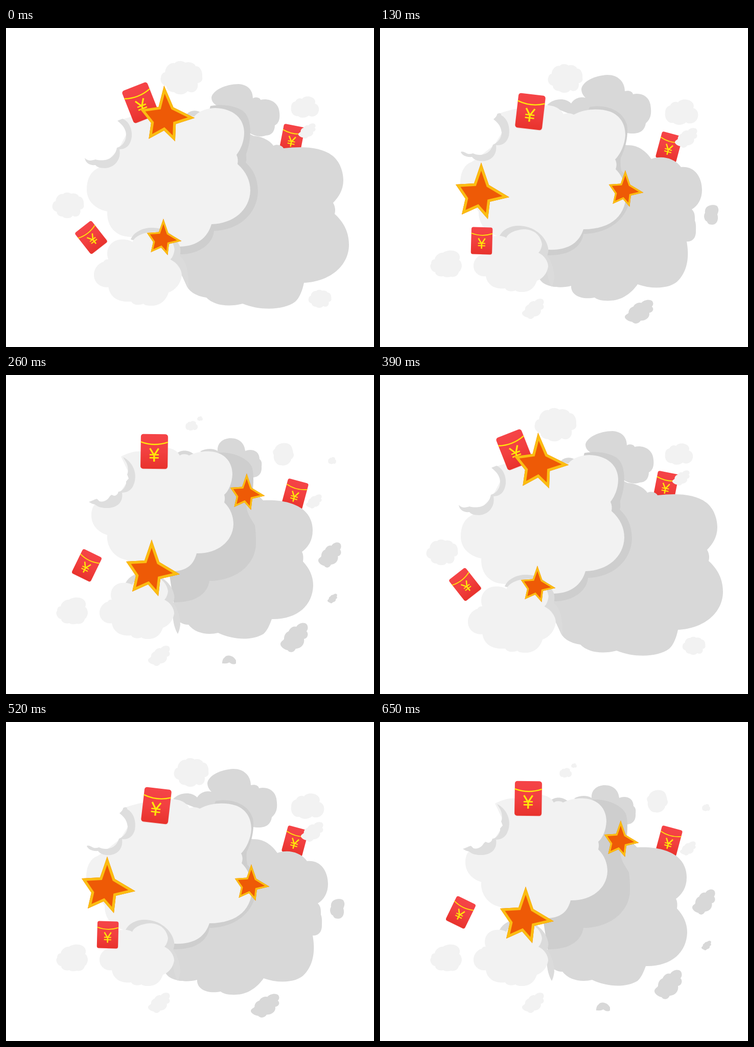
Recreate the animation shown at these times as an HTML page with a canvas. Size 720x626 px, loop 0.78 s.

```html
<!DOCTYPE html>
<html lang="en">
<head>
<meta charset="utf-8">
<title>Dust cloud</title>
<style>
html, body { margin: 0; width: 100%; height: 100%; overflow: hidden; background: #fff; }
canvas { display: block; width: 720px; height: 626px; }
</style>
</head>
<body>
<canvas id="stage" width="720" height="626"></canvas>
<script>
const ctx = document.getElementById('stage').getContext('2d');
const STEP = 130;
const LIGHT = '#f2f2f2', GREY = '#d8d8d8', SHADE = '#cecece', RIM = '#dedede';

// Puff outlines with their own bounding boxes
const PUFFS = {
  round: {
    box: [303, 65, 82, 65],
    d: 'M311 87C312 75 322 67 330 69C336 63 346 64 351 68C360 65 370 70 371 75C380 74 385 86 384 96C386 105 378 108 375 108C377 118 371 126 364 126C359 127 357 124 355 124C350 132 335 132 329 126C322 126 314 122 314 114C304 112 301 102 303 97C304 90 308 87 311 87Z'
  },
  wide: {
    box: [98, 436, 62, 53],
    d: 'M107 454C108 446 117 440 123 441C133 434 150 435 155 445C157 450 156 452 155 455C161 460 161 470 158 474C157 477 155 478 154 479C153 486 145 490 139 488C133 490 126 489 124 487C116 489 108 485 108 479C100 478 96 466 100 463C100 457 103 454 107 454Z'
  },
  slant: {
    box: [557, 140, 65, 50],
    d: 'M568 152C570 146 578 143 583 146C589 138 607 138 613 149C614 152 614 154 613 157C623 160 625 173 619 181C614 188 603 189 599 185C592 191 580 192 574 186C566 188 556 180 558 166C558 158 562 153 568 152Z'
  },
  steep: {
    box: [537, 486, 54, 58],
    d: 'M553 503C556 495 564 492 568 494C573 486 585 484 589 490C592 496 590 500 588 503C593 508 590 517 583 518C585 528 577 537 567 537C563 545 555 546 551 540C545 539 536 533 537 527C538 522 543 521 544 518C544 510 548 505 553 503Z'
  },
  tall: {
    box: [634, 347, 29, 40],
    d: 'M643 349C650 346 660 347 661 352C664 358 661 362 660 366C663 374 660 386 650 386C643 386 641 383 640 380C633 377 633 366 636 363C635 356 638 351 643 349Z'
  },
  egg: {
    box: [522, 133, 41, 45],
    d: 'M526 145C530 133 548 130 557 138C560 142 561 148 562 153C565 158 561 164 558 165C557 174 545 180 538 177C530 178 522 166 524 157C521 152 522 148 526 145Z'
  },
  cap: {
    box: [423, 549, 28, 19],
    d: 'M423 566C423 560 425 556 427 555C432 547 445 550 450 560L450 566C446 569 440 567 437 564C432 567 427 566 423 566Z'
  }
};

const FRONT_CLOUD = 'M207 441C201 425 210 410 226 408C236 407 243 409 247 412C250 403 265 395 285 395C305 397 315 410 317 424C316 433 313 438 310 441C322 447 329 458 329 468C327 482 318 492 307 496C302 512 290 519 276 518C270 518 268 517 265 515C258 518 248 517 245 511C225 513 210 505 207 487C195 489 183 480 183 467C183 454 193 446 199 445C200 442 204 440 207 441Z';
const FRONT_RIM = 'M234 408C240 395 255 388 271 388C300 388 325 408 329 432C330 438 329 442 327 446C337 460 341 475 341 490C340 498 338 505 336 508C330 498 327 485 326 470L290 430L247 412Z';

// Puffs: [kind, x, y, w, h, colour]; notes and stars: [x, y, scale, degrees]
const POSES = [
  {
    puffs: [['round', 303, 65, 82, 65], ['round', 91, 323, 62, 50], ['round', 592, 514, 45, 35], ['slant', 557, 134, 55, 42]],
    over: ['steep', 572, 187, 34, 30],
    back: 'M402 136C405 122 430 110 455 110C472 111 483 121 483 138C487 135 497 136 498 141C515 137 531 146 534 160C538 178 533 188 526 191C526 202 520 211 508 211C498 215 485 212 475 205C440 190 412 170 412 152C406 148 402 144 402 136ZM350 174C358 160 372 160 382 166L370 180Z',
    dark: 'M485 212C500 212 518 222 523 231C532 227 540 231 543 236C580 232 615 233 638 250C655 263 660 285 660 299C660 318 650 333 640 343C644 350 645 358 643 365C660 380 671 400 671 425C671 468 632 498 583 500C580 515 574 530 566 537C545 553 500 556 463 541C435 548 408 545 392 529C370 526 357 515 353 505L343 483L325 420L460 250L470 205Z',
    shade: 'M400 153C430 148 455 155 466 165C480 178 482 215 470 247C470 255 471 260 469 264C488 282 492 300 493 320C492 365 455 397 407 398C405 425 375 445 340 444L330 400Z',
    main: 'M178 276L190 270L220 238L240 200L227 180C250 170 300 166 352 171C358 171 364 172 368 174C378 162 395 157 410 157C445 158 466 178 466 205C466 222 460 237 451 249C454 255 454 261 453 267C470 282 478 300 478 319C477 357 445 384 402 385C395 410 375 428 341 429L245 410C215 410 197 390 198 360C175 355 158 340 158 317C158 297 165 283 178 276Z',
    bite: 'M218 182L228 178C240 183 247 197 246 213C244 230 235 238 222 238C226 258 212 275 193 275C183 275 177 272 175 269C165 270 156 266 154 255C160 262 168 260 175 258C190 262 212 260 217 235C233 230 237 215 234 203C231 193 225 188 218 182Z',
    rim: 'M244 415C250 400 268 392 285 392C310 391 330 405 340 428C342 435 342 440 340 447C353 458 358 478 357 512L343 483L300 430Z',
    front: [172, 400, 1.178],
    notes: [[559.5, 217.5, .78, 11], [263, 146.5, 1, -21.5], [166.5, 411, .78, -38]],
    stars: [[311, 174, 1, -4.5], [306, 413.5, .645, 0]]
  },
  {
    puffs: [['round', 329, 71, 68, 56], ['slant', 557, 140, 65, 50], ['wide', 98, 436, 62, 53], ['steep', 278, 531, 43, 40], ['tall', 634, 347, 29, 40, GREY], ['steep', 479, 533, 56, 47, GREY]],
    over: ['steep', 577, 196, 44, 39],
    back: 'M394 120C396 105 420 93 445 92C465 92 479 105 479 124C486 122 494 124 495 130C512 126 526 135 529 150C532 168 530 178 520 187C518 200 510 208 490 207L470 204L400 180L327 151C340 138 362 136 374 148C380 138 392 134 402 137C397 132 394 126 394 120Z',
    dark: 'M484 230C504 229 520 241 531 257C550 250 575 254 589 273C615 270 630 292 630 318C630 335 622 349 610 356C617 362 616 372 616 378C619 384 618 396 618 400C618 413 610 420 600 419C605 445 603 475 584 495C570 511 535 514 504 503C490 523 470 535 450 535C435 536 425 533 420 529C395 534 373 525 374 506C350 512 320 508 312 492L325 430L460 250L470 228Z',
    shade: 'M410 155C440 149 475 160 483 190C487 215 478 240 471 255C470 265 471 272 472 280C488 295 490 310 489 325C490 370 450 404 398 404C394 430 370 447 328 446L320 400Z',
    main: 'M179 263L190 256L224 229L242 200L235 167C260 159 290 152 323 152C340 150 355 160 359 169C366 166 374 167 379 170C400 158 430 157 450 164C470 172 480 188 480 210C479 230 470 248 460 258C464 265 463 272 461 277C472 288 479 302 481 320C484 365 455 395 398 395C390 420 370 437 328 435L235 410C205 400 193 385 193 360L175 340L157 306C157 283 165 268 179 263Z',
    bite: 'M229 169C233 166 238 167 237 171C250 178 255 195 252 212C248 225 240 231 227 230C229 245 222 258 205 261C195 262 185 260 180 253C170 254 160 250 158 243C163 241 167 245 172 247C177 248 180 246 182 246C195 252 215 250 221 229C231 225 238 215 238 205C236 190 229 185 222 179C226 176 229 172 229 169Z',
    rim: FRONT_RIM,
    front: [183, 395, 1],
    notes: [[565.5, 233.5, .78, 15], [294, 164, 1, 6.5], [199, 417.5, .78, 1.5]],
    stars: [[195, 325, 1, 0], [478, 318.5, .645, 0]]
  },
  {
    puffs: [['slant', 351, 90, 24, 19], ['slant', 374, 81, 11, 9], ['egg', 522, 133, 41, 45], ['slant', 630, 161, 16, 14], ['wide', 98, 436, 62, 53], ['steep', 278, 531, 43, 40], ['steep', 611, 328, 45, 50, GREY], ['steep', 629, 429, 19, 19, GREY], ['steep', 537, 486, 54, 58, GREY], ['cap', 423, 549, 28, 19, GREY]],
    over: ['steep', 587, 234, 31, 28],
    back: 'M414 149C413 133 425 124 440 124C457 124 467 135 468 149C480 144 496 148 496 165C500 168 501 172 500 180C501 192 495 201 482 201L440 190L380 150C390 144 405 143 414 149ZM332 156C340 146 358 146 368 156L350 170Z',
    dark: 'M480 222L503 246C540 244 565 252 580 263C595 275 600 290 600 305C600 325 591 338 579 347C582 352 582 360 581 366C594 380 601 395 601 413C600 452 570 480 520 479C515 492 512 500 504 508C480 522 445 520 415 506C395 511 370 507 357 490C350 490 345 488 340 485L325 450L440 300L468 250Z',
    shade: 'M408 154C430 148 470 158 481 180C484 190 485 205 483 224L470 255C471 272 480 283 487 295C489 310 489 320 489 330C489 372 450 404 398 404C394 430 370 447 328 446L318 380L400 200Z',
    main: 'M174 254L190 256L224 229L244 200L225 160C240 152 255 149 264 150L317 143C328 145 336 150 340 158C346 154 354 155 358 158C375 150 390 149 400 150C427 152 443 170 443 195C442 213 436 227 427 235C429 242 428 246 427 250C440 263 445 278 445 293C444 328 412 351 373 350C367 372 355 383 330 385L250 380L236 363C215 360 196 340 198 314C180 308 167 295 167 275C167 265 170 257 174 254Z',
    bite: 'M229 161C247 170 256 190 252 208C248 225 240 230 227 231C230 250 217 262 195 261C188 261 180 259 174 254C168 253 166 251 162 249C169 247 173 244 178 243L183 248C188 249 193 248 197 245C201 243 203 236 207 235C212 239 218 237 220 229C228 229 236 217 235 209L240 203L237 195C240 190 239 178 235 171Z',
    rim: FRONT_RIM,
    front: [183, 395, 1],
    notes: [[565.5, 233.5, .78, 15], [290, 150, 1, .8], [158, 373.5, .78, 26]],
    stars: [[282, 384, 1, 0], [469, 232.5, .645, 0]]
  }
];

const STAR = [[3, -61], [18, -17], [58, 7], [20, 16], [16, 50], [-4, 27], [-35, 41], [-28, 10], [-47, -18], [-11, -20]];

function fill(d, colour) {
  ctx.fillStyle = colour;
  ctx.fill(new Path2D(d));
}

function placed(x, y, scale, degrees, draw) {
  ctx.save();
  ctx.translate(x, y);
  ctx.rotate(degrees * Math.PI / 180);
  ctx.scale(scale, scale);
  draw();
  ctx.restore();
}

function puff([kind, x, y, w, h, colour = LIGHT]) {
  const { box, d } = PUFFS[kind];
  ctx.save();
  ctx.translate(x, y);
  ctx.scale(w / box[2], h / box[3]);
  ctx.translate(-box[0], -box[1]);
  fill(d, colour);
  ctx.restore();
}

function card(x, y, colour) {
  ctx.fillStyle = colour;
  ctx.beginPath();
  ctx.roundRect(x, y, 53, 68, 5);
  ctx.fill();
}

function envelope([x, y, scale, degrees]) {
  placed(x, y, scale, degrees, () => {
    const red = ctx.createLinearGradient(0, -34, 0, 34);
    red.addColorStop(0, '#f54447');
    red.addColorStop(.5, '#f24040');
    red.addColorStop(1, '#e8322c');
    card(-26, -33, 'rgba(232,50,44,.2)');
    card(-26.5, -34, red);
    ctx.strokeStyle = '#ffe60a';
    ctx.lineWidth = 2.3;
    ctx.stroke(new Path2D('M-26.5 -18.5Q0 -9 26.5 -18.5'));
    ctx.lineWidth = 3.3;
    ctx.stroke(new Path2D('M-8.5 -6L0 7.5L8.5 -6M0 7V20'));
    ctx.lineWidth = 2.6;
    ctx.stroke(new Path2D('M-9 6.5H9M-9 12.5H9'));
  });
}

function star([x, y, scale, degrees]) {
  const shape = new Path2D('M' + STAR.join('L') + 'Z');
  placed(x, y, scale, degrees, () => {
    ctx.fillStyle = '#ee5a06';
    ctx.fill(shape);
    // Only the inner half of the border shows
    ctx.clip(shape);
    ctx.strokeStyle = '#fbbd12';
    ctx.lineWidth = 10.4;
    ctx.stroke(shape);
  });
}

function paint(pose) {
  ctx.fillStyle = '#fff';
  ctx.fillRect(0, 0, 720, 626);
  pose.puffs.forEach(puff);
  fill(pose.back, GREY);
  const [behind, ...notes] = pose.notes;
  envelope(behind);
  fill(pose.dark, GREY);
  puff(pose.over);
  fill(pose.shade, SHADE);
  fill(pose.main, LIGHT);
  fill(pose.bite, RIM);
  fill(pose.rim, '#dbdbdb');
  const [x, y, scale] = pose.front;
  placed(x, y, scale, 0, () => {
    ctx.translate(-183, -395);
    fill(FRONT_CLOUD, LIGHT);
  });
  notes.forEach(envelope);
  pose.stars.forEach(star);
}

function tick() {
  paint(POSES[Math.floor(performance.now() / STEP) % POSES.length]);
  requestAnimationFrame(tick);
}
tick();
</script>
</body>
</html>
```
